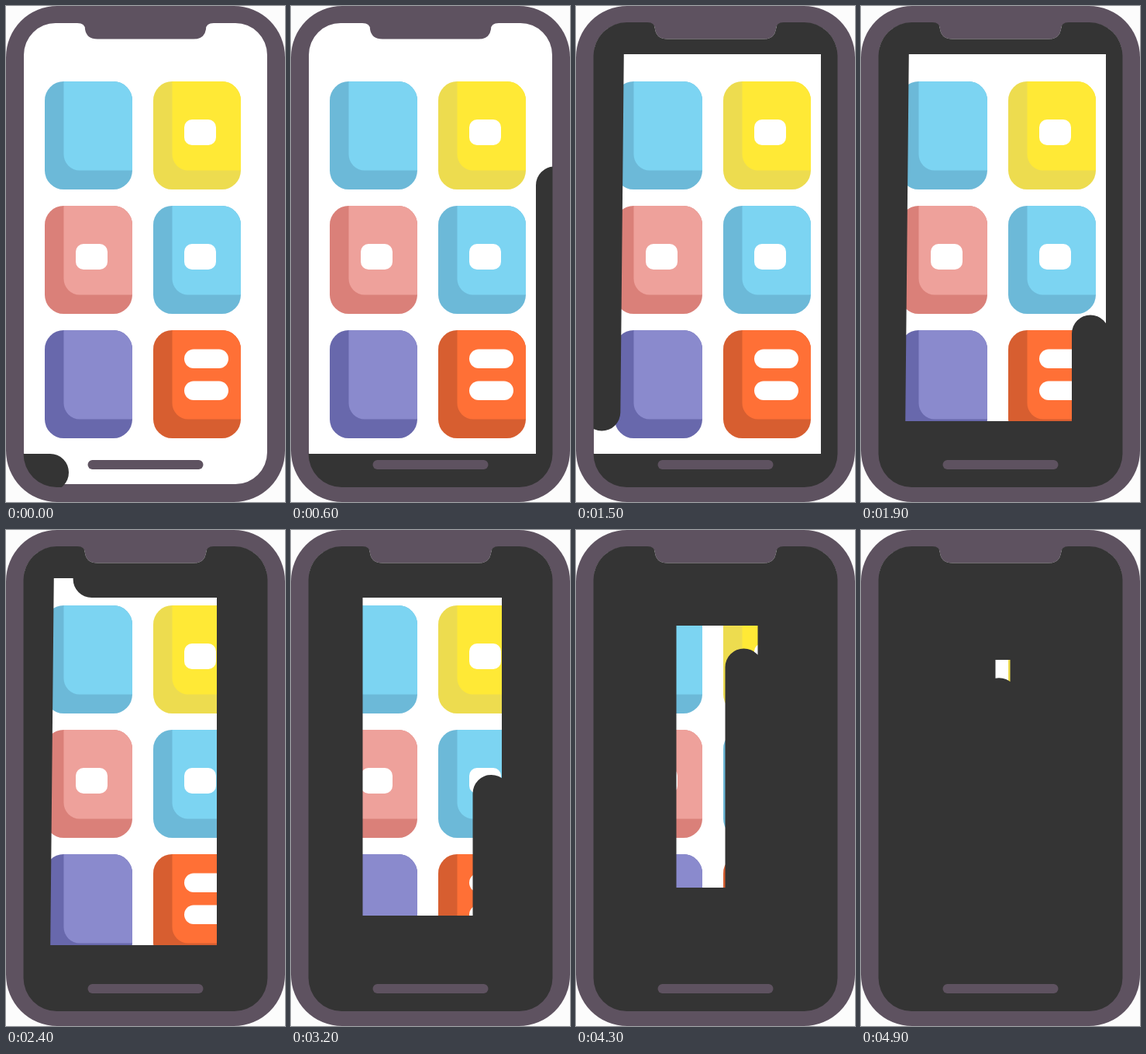
An HTML page that plays this animation: 360x638 px, repeating every 5000 ms.

```html
<!DOCTYPE html>
<html lang="en">
<head>
<meta charset="utf-8">
<title>Phone screen wipe</title>
<style>
  html, body { margin: 0; width: 100%; height: 100%; overflow: hidden; background: #fcfcfc; }
  svg { display: block; width: 100%; height: 100%; }
</style>
</head>
<body>
<svg viewBox="0 0 360 638">
  <defs>
    <clipPath id="tile"><rect width="113" height="139" rx="24.5"/></clipPath>
    <clipPath id="glass"><path id="glassShape"/></clipPath>
  </defs>
  <rect width="360" height="638" rx="66" fill="#5e5260"/>
  <path id="screen" fill="#fff"/>
  <g id="tiles"></g>
  <g clip-path="url(#glass)">
    <path id="snake" fill="none" stroke="#343434" stroke-width="48" stroke-linecap="round"
      stroke-linejoin="miter" d="M-30 600H340V38H38L33 558H296V63H68.5V520H258.5V99H105.5V484H216.5V143H149.5V440.5H178V120"/>
  </g>
  <rect x="105.5" y="584" width="149" height="12" rx="6" fill="#5e5260"/>
</svg>
<script>
const LOOP = 5000, STEP = 100;
const START = 87;      // visible length when the loop begins
const SPEED = 1.0877;  // px per ms

const $ = id => document.getElementById(id);

// Rounded screen outline with the notch cut into its top edge
function outline(left, top, right, bottom, r) {
  return `M${left} ${top + r}A${r} ${r} 0 0 1 ${left + r} ${top}H92` +
    `Q102 ${top} 102 30Q104 42.5 118 42.5H242Q256 42.5 258 30Q258 ${top} 268 ${top}` +
    `H${right - r}A${r} ${r} 0 0 1 ${right} ${top + r}V${bottom - r}` +
    `A${r} ${r} 0 0 1 ${right - r} ${bottom}H${left + r}` +
    `A${r} ${r} 0 0 1 ${left} ${bottom - r}Z`;
}

const box = (x, y, w, h, r) =>
  `<rect x="${x}" y="${y}" width="${w}" height="${h}" rx="${r}" fill="#fff"/>`;
const badge = box(40, 49, 41, 33, 10);
const pills = box(40, 24.5, 57, 24.5, 12.25) + box(40, 65.5, 57, 24.5, 12.25);

function tile(col, row, light, dark, mark = '') {
  return `<g transform="translate(${50 + col * 140} ${97 + row * 160})" clip-path="url(#tile)">` +
    `<rect width="113" height="139" fill="${dark}"/>` +
    `<path d="M24.5 0H113V114.5H45A20.5 20.5 0 0 1 24.5 94Z" fill="${light}"/>${mark}</g>`;
}

$('screen').setAttribute('d', outline(23, 22, 337, 615, 41));
$('glassShape').setAttribute('d', outline(22.5, 21, 337.5, 619, 43));
$('tiles').innerHTML =
  tile(0, 0, '#7cd4f2', '#6cb9d8') +
  tile(1, 0, '#ffe936', '#eddc4f', badge) +
  tile(0, 1, '#eea19b', '#da8079', badge) +
  tile(1, 1, '#7cd4f2', '#6cb9d8', badge) +
  tile(0, 2, '#8a8acd', '#6868ac') +
  tile(1, 2, '#ff7036', '#d75e30', pills);

function draw(ms) {
  const t = Math.floor((ms % LOOP) / STEP) * STEP;
  $('snake').setAttribute('stroke-dasharray', `${START + SPEED * t} 9999`);
}

let origin;
function tick(now) {
  origin ??= now;
  draw(now - origin);
  requestAnimationFrame(tick);
}
draw(0);
requestAnimationFrame(tick);
</script>
</body>
</html>
```
